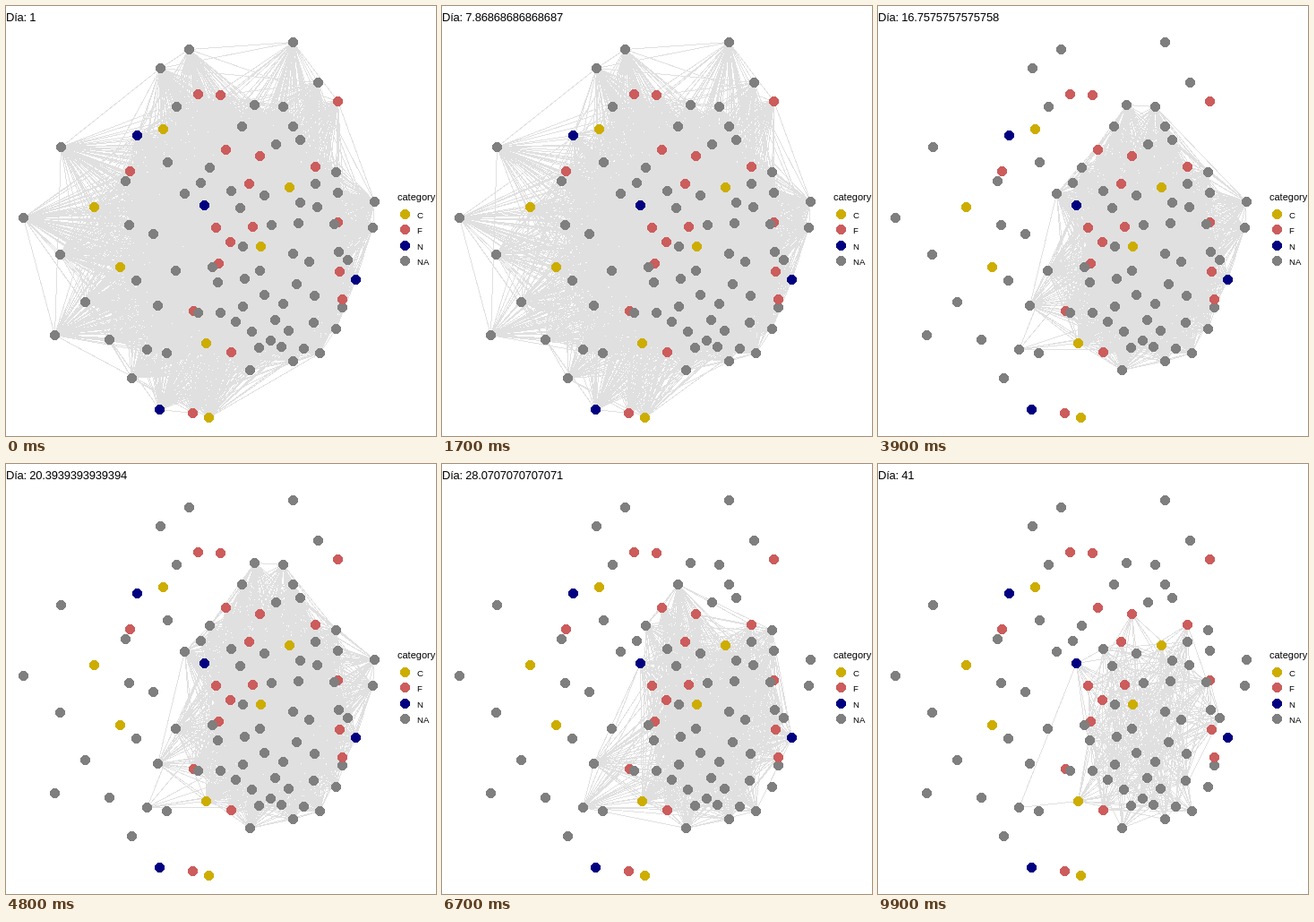
Recreate the animation shown at these times as an HTML page. Size 480 by 480 pixels, loop 10000 ms.

```html
<!DOCTYPE html>
<html lang="es">
<head>
<meta charset="utf-8">
<title>Red por día</title>
<style>
html, body { margin: 0; width: 100%; height: 100%; overflow: hidden; background: #fff; }
svg { display: block; width: 480px; height: 480px; }
text { font-family: "Liberation Sans", Arial, sans-serif; fill: #000; }
#day { font-size: 13px; letter-spacing: -.22px; }
#edges path { fill: none; stroke: #e0e0e0; stroke-width: 1; shape-rendering: crispEdges; }
circle { shape-rendering: crispEdges; }
</style>
</head>
<body>
<svg viewBox="0 0 480 480">
  <g id="edges"></g>
  <g id="nodes"></g>
  <text id="day" x="0" y="17">Día: 1</text>
  <g id="legend"><text x="437" y="217" font-size="11">category</text></g>
</svg>
<script>
const colours = { C: '#cdad00', F: '#cd5c5c', N: '#000080', NA: '#7f7f7f' };

// Each group keeps its activity as [day, level] points; nodes are x, y pairs per category.
const groups = [
  {
    level: [[1, .75], [7, .58], [13, .45], [14, 0]],
    C: [175,137, 98,224, 127,291, 226,459],
    F: [214,98, 239,99, 370,106, 138,184, 208,454],
    N: [146,144, 171,450],
    NA: [204,48, 320,40, 172,69, 348,85, 190,112, 61,157, 180,174, 133,195, 19,236,
      137,244, 164,254, 60,277, 145,306, 88,330, 54,367, 115,372, 140,415, 179,387]
  },
  {
    level: [[1, .95], [7, .9], [16, .82], [20, .75], [21, 0]],
    F: [209,340],
    NA: [277,110, 309,112, 320,134, 328,149, 301,154, 411,218, 409,247, 199,209,
      217,197, 189,295, 214,342, 375,336, 368,360]
  },
  {
    level: [[1, 1], [16, .9], [24, .76], [29, .7], [30, 0]],
    F: [245,160, 375,327],
    N: [390,305],
    NA: [263,134, 227,180, 368,185, 370,208]
  },
  { level: [[1, .8], [16, .65], [24, .14], [28, .7], [29, .6], [30, 0]], NA: [169,334] },
  { level: [[1, .7], [13, .4], [16, .06], [24, .1], [28, .6], [29, .4], [30, 0]], NA: [157,383] },
  {
    level: [[1, 1], [7, .95], [16, .9], [24, .8], [28, .77], [34, .57], [41, .54]],
    C: [316,202, 284,268, 223,376],
    F: [283,167, 345,179, 271,198, 234,247, 275,246, 370,241, 250,263, 237,287,
      372,296, 251,386],
    N: [221,222],
    NA: [345,198, 251,206, 288,211, 261,225, 328,219, 347,224, 296,244, 326,242,
      366,243, 264,268, 320,276, 338,285, 371,274, 381,283, 230,291, 236,308,
      266,304, 283,295, 324,310, 344,323, 288,322, 309,332, 264,335, 239,342,
      256,352, 300,350, 274,363, 315,362, 343,353, 295,373, 282,381, 307,380,
      332,382, 350,387, 320,396, 272,406]
  }
];

// Links that stay for the whole loop.
const lasting = [[157,383, 221,222], [157,383, 223,376]];

const $ = id => document.getElementById(id);

function add(parent, name, attrs, text) {
  const el = document.createElementNS('http://www.w3.org/2000/svg', name);
  for (const key in attrs) el.setAttribute(key, attrs[key]);
  if (text) el.textContent = text;
  parent.appendChild(el);
  return el;
}

const dot = (parent, x, y, category) =>
  add(parent, 'circle', { cx: x + .5, cy: y + .5, r: 5.6, fill: colours[category] });

const nodes = [];
for (const group of groups) {
  for (const category in colours) {
    const points = group[category] || [];
    for (let k = 0; k < points.length; k += 2) {
      const [x, y] = [points[k], points[k + 1]];
      dot($('nodes'), x, y, category);
      nodes.push({ x, y, group, path: add($('edges'), 'path', {}) });
    }
  }
}

Object.keys(colours).forEach((category, i) => {
  const y = Math.round(232 + i * 17.3);
  dot($('legend'), 445, y, category);
  add($('legend'), 'text', { x: 459, y: y + 4.5, 'font-size': 9.6 }, category);
});

function levelAt(points, day) {
  const next = points.findIndex(p => p[0] > day);
  if (next < 0) return points[points.length - 1][1];
  const [d0, v0] = points[next - 1], [d1, v1] = points[next];
  return v0 + (v1 - v0) * (day - d0) / (d1 - d0);
}

function chance(i, j) {
  const v = Math.sin(i * 127.1 + j * 311.7) * 43758.5453;
  return v - Math.floor(v);
}

const line = (x1, y1, x2, y2) => `M${x1 + .5} ${y1 + .5}L${x2 + .5} ${y2 + .5}`;

add($('edges'), 'path', { d: lasting.map(p => line(...p)).join('') });

function drawEdges(day) {
  const levels = nodes.map(n => levelAt(n.group.level, day));
  nodes.forEach((a, i) => {
    let d = '';
    for (let j = i + 1; j < nodes.length; j++) {
      if (chance(i, j) < levels[i] * levels[j]) d += line(a.x, a.y, nodes[j].x, nodes[j].y);
    }
    a.path.setAttribute('d', d);
  });
}

let shownStep = -1, shownDay = 0;

function tick() {
  const step = Math.floor(performance.now() / 100) % 100;
  if (step !== shownStep) {
    shownStep = step;
    const time = 1 + step * 40 / 99;
    $('day').textContent = 'Día: ' + Number(time.toPrecision(15));
    const day = Math.floor(time + 1e-9);
    if (day !== shownDay) drawEdges(shownDay = day);
  }
  requestAnimationFrame(tick);
}
tick();
</script>
</body>
</html>
```
